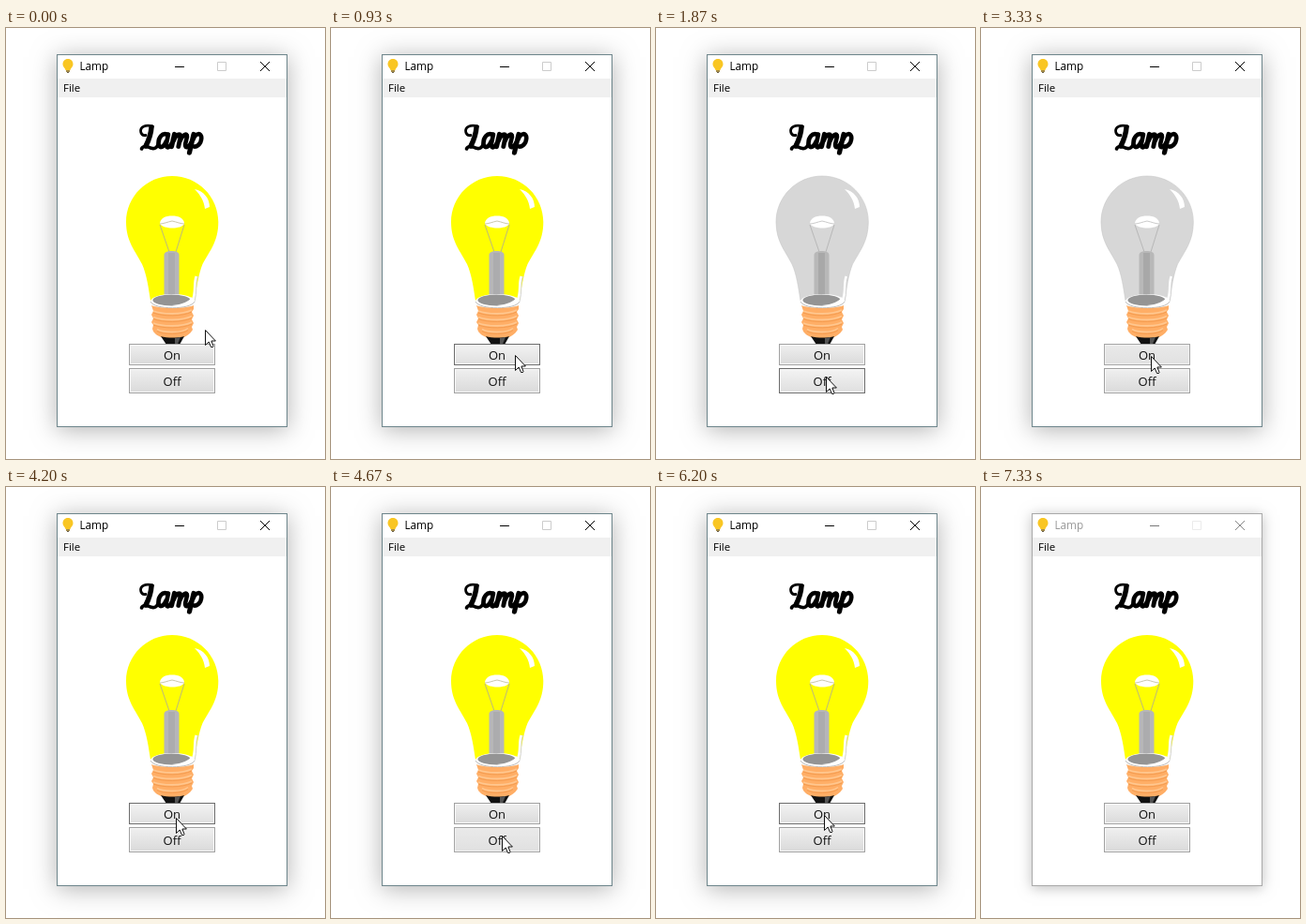
An HTML page with a canvas that plays this animation: 340 px wide and 460 px high, repeating every 7.47 s.

```html
<!DOCTYPE html>
<html lang="en">
<head>
<meta charset="utf-8">
<title>Lamp</title>
<style>
html, body { margin: 0; width: 100%; height: 100%; overflow: hidden; background: #fff; }
canvas { display: block; }
</style>
</head>
<body>
<canvas id="stage" width="340" height="460" role="img" aria-label="Lamp window with On and Off buttons"></canvas>
<script>
const ctx = document.getElementById('stage').getContext('2d');
const LOOP = 7470, TICK = 200 / 3;
const FONT = '"Open Sans", "Noto Sans", sans-serif';

// Pointer stops: tick, x, y
const stops = [
  [0, 212, 322], [9, 212, 322], [14, 196, 349], [21, 181, 371], [23, 181, 371],
  [24, 181, 372], [37, 181, 372], [42, 181, 363], [44, 181, 363], [49, 181, 350],
  [62, 181, 350], [69, 182, 372], [79, 182, 372], [83, 179, 359], [84, 179, 359],
  [87, 179, 350], [93, 179, 350], [103, 53, 466], [112, 53, 480]
];
const buttons = [
  { label: 'On', y: 337, h: 23, presses: [[50, 54], [90, 93]] },
  { label: 'Off', y: 363, h: 27, presses: [[25, 28], [70, 74]] }
];
const within = (n, [a, b]) => n >= a && n < b;
const isLit = n => n < 28 || within(n, [55, 74]) || n >= 93;

function pointerAt(n) {
  let i = 0;
  while (i < stops.length - 2 && n >= stops[i + 1][0]) i++;
  const [a, ax, ay] = stops[i], [b, bx, by] = stops[i + 1];
  const k = (n - a) / (b - a);
  return { x: Math.round(ax + (bx - ax) * k), y: Math.round(ay + (by - ay) * k) };
}

function fill(d, color) {
  ctx.fillStyle = color;
  ctx.fill(new Path2D(d));
}
function stroke(d, color, width = 1) {
  ctx.strokeStyle = color;
  ctx.lineWidth = width;
  ctx.stroke(new Path2D(d));
}
function rect(x, y, w, h, color) {
  ctx.fillStyle = color;
  ctx.fillRect(x, y, w, h);
}
function oval(x, y, rx, ry, color) {
  ctx.fillStyle = color;
  ctx.beginPath();
  ctx.ellipse(x, y, rx, ry, 0, 0, Math.PI * 2);
  ctx.fill();
}
function text(s, x, y, size, color, align = 'left') {
  ctx.font = size + 'px ' + FONT;
  ctx.textAlign = align;
  ctx.fillStyle = color;
  ctx.fillText(s, x, y);
}
function vertical(y, h, top, bottom) {
  const g = ctx.createLinearGradient(0, y, 0, y + h);
  g.addColorStop(0, top);
  g.addColorStop(1, bottom);
  return g;
}

function drawWindow(active) {
  ctx.save();
  ctx.shadowColor = active ? 'rgba(0,0,0,.3)' : 'rgba(0,0,0,.25)';
  ctx.shadowBlur = active ? 24 : 13;
  ctx.shadowOffsetY = active ? 3 : 2;
  rect(54, 28, 246, 398, active ? '#6d858b' : '#a9a9a9');
  ctx.restore();
  rect(55, 29, 244, 396, '#fff');
  rect(55, 54, 244, 20, '#f0f0f0');

  fill('M66 33C69.5 33 71.5 35.5 71.5 38.5C71.5 41.5 69 42.5 68.5 45H63.5C63 42.5 60.5 41.5 60.5 38.5C60.5 35.5 62.5 33 66 33Z', '#f9c623');
  rect(64, 45, 4, 2, '#a58d4a');
  rect(65, 47, 2, 1, '#6b6250');

  const ink = active ? '#000' : '#999';
  text('Lamp', 78.5, 45, 11.7, ink);
  text('File', 61, 68, 11.5, '#000');
  stroke('M180 41.5H190', active ? ink : '#777');
  stroke('M225.5 36.5H234.5V45.5H225.5Z', active ? '#ccc' : '#ebebeb');
  stroke('M271 36L281 46M281 36L271 46', active ? ink : '#888');
}

function drawHeading() {
  ctx.lineCap = ctx.lineJoin = 'round';
  const ink = '#000';
  // L
  stroke('M149 114.5C143 115.5 141.5 107.5 147 105C150 103.7 153 104 156.5 105', ink, 2.8);
  stroke('M155 106C154.5 114 152 120 149 126', ink, 5.4);
  stroke('M144.5 129C146 125 151 126.5 155 128.3C159 129.5 161.5 127 162.5 123', ink, 3.6);
  // a
  stroke('M171.5 113.5C166.5 111.5 162.5 117 162.5 122.5C162.5 129 167.5 128.5 170.5 121.5', ink, 4.6);
  stroke('M173 113.5L171 123C170 128.5 173.5 129 176.5 123.5', ink, 4.6);
  // m
  stroke('M179.5 113.5L176.5 126.5', ink, 5.2);
  stroke('M178.5 120.5C181 113.5 186.5 111.5 186 116L183.8 126.5', ink, 4.8);
  stroke('M185.5 120.5C188 113.5 193.5 111.5 193 116L191.3 123C190.3 128.5 194 129 197 123', ink, 4.6);
  // p
  stroke('M200 113.5L195.5 133', ink, 5.2);
  stroke('M199.5 119C202 111.5 208.5 111.5 208.3 117.5C208 124 203 128 198.5 126', ink, 4.6);
  ctx.lineCap = 'butt';
  ctx.lineJoin = 'miter';
}

const GLASS = 'M177 158C204.5 158 226.3 180 226.3 207C226.3 228 217 238 209.5 252C205 263 203 278 201 291' +
  'C193 299 162 299 154 291C152 278 150 263 145 252C138 238 128 228 128 207C128 180 150 158 177 158Z';

function drawBulb(lit) {
  fill(GLASS, lit ? '#ff0' : '#d7d7d7');
  if (!lit) stroke(GLASS, '#c8c8c8', 0.6);

  fill('M201 172C211 174 217 182 217 191L212 193C211 184 207 178 201 172Z', '#fff');

  // Filament and its support
  const wire = lit ? '#b5b18a' : '#b4b4b4';
  stroke('M164 210L174 239M190 210L181 239', wire, 0.9);
  fill('M164 209C164 203 170 200.5 177 200.5C184 200.5 190 203 190 209C187 215 168 215 164 209Z', '#fff');
  stroke('M164 209C168 209 172 207 177 206C182 207 186 209 190 209', wire, 0.7);
  fill('M168.5 289V242C168.5 236.5 184.5 236.5 184.5 242V289Z', lit ? '#b6b6b8' : '#b8b8b8');
  rect(173, 240, 7, 49, lit ? '#acacae' : '#a8a8a8');

  // Neck and collar
  stroke('M203 265C200 273 203 282 199 291', '#fff', 3);
  stroke('M204.5 265C201.5 273 204 282 201 292', '#c9c9c9', 0.8);
  oval(177.5, 291.5, 23.5, 7.5, '#fff');
  oval(176.5, 290.5, 20, 6, '#949494');
  fill('M177 296C188 295 195 292 198 287C201 294 191 299 177 296Z', '#fff');
  stroke('M154 292C158 301 197 301 201 292', '#aaa', 0.8);

  // Screw thread
  fill('M155 296C164 300 191 300 200 296V300L198 303L200 307L198 311L200 315L198 319L199 322' +
    'C196 327 191 330 187 331H168C162 329 157 326 156 321L157 317L155 314L157 310L155 306L157 302Z', '#ffae66');
  for (let y = 302; y < 328; y += 6.5) {
    const inset = y > 320 ? 4 : 0;
    stroke(`M${157 + inset} ${y}C167 ${y + 4} 188 ${y + 4} ${198 - inset} ${y - 1}`, '#ffc78f', 1.6);
    stroke(`M${157 + inset} ${y + 2}C167 ${y + 6} 188 ${y + 6} ${198 - inset} ${y + 1}`, '#f49c50', 1);
  }
  fill('M165 329C172 331 183 331 190 329L185 338H171Z', '#111');
  fill('M180 331L186 330L183 337H180Z', '#555');
}

function drawButton({ label, y, h, presses }, n, p) {
  const hover = p.x >= 131 && p.x < 223 && p.y >= y && p.y < y + h;
  const down = presses.some(span => within(n, span));
  rect(131, y, 92, h, down ? '#a5a5a5' : hover ? '#6c6c6c' : '#a0a0a0');
  rect(132, y + 1, 90, h - 2, down ? '#f0f0f0' : '#f8f8f8');
  rect(133, y + 2, 88, h - 4, down ? vertical(y, h, '#eaeaea', '#e0e0e0')
    : hover ? vertical(y, h, '#f4f4f4', '#dedede') : vertical(y, h, '#f0f0f0', '#d9d9d9'));
  text(label, 177, y + (h >> 1) + 6, 13, '#111', 'center');
}

function drawPointer({ x, y }) {
  ctx.save();
  ctx.translate(x, y);
  ctx.lineJoin = 'round';
  const arrow = 'M.5 .5V16.5L4.2 13L6.5 18.5H8.5L9 17.5L6.9 12H11.4Z';
  fill(arrow, '#fff');
  stroke(arrow, '#111');
  ctx.restore();
}

function draw(time) {
  const n = Math.min(111, Math.floor((time % LOOP + 3.5) / TICK));
  const p = pointerAt(n);
  rect(0, 0, 340, 460, '#fff');
  drawWindow(n < 110);
  drawHeading();
  drawBulb(isLit(n));
  buttons.forEach(b => drawButton(b, n, p));
  if (n < 103) drawPointer(p);
}

const start = performance.now();
function loop() {
  draw(performance.now() - start);
  requestAnimationFrame(loop);
}
loop();
</script>
</body>
</html>
```
